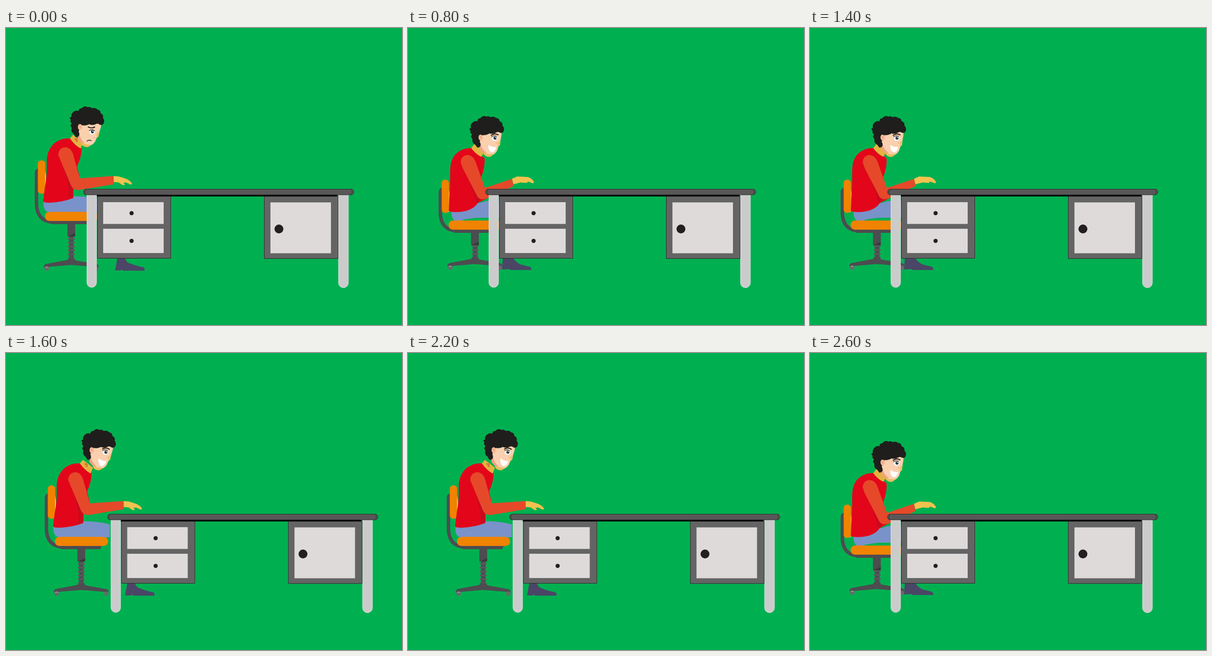
Animation, 864 px wide and 648 px high, one loop 2800 ms. Source, as an HTML page without scripts:

```html
<!DOCTYPE html>
<html lang="en">
<head>
<meta charset="utf-8">
<title>At the desk</title>
<style>
html, body { margin: 0; width: 100%; height: 100%; overflow: hidden; background: #00b050; }
svg { display: block; width: 864px; height: 648px; }
.pose { visibility: hidden; animation: 2.8s step-end infinite; }
.tired { animation-name: tired; }
.upright { animation-name: upright; }
.lean { animation-name: lean; }
.far { animation-name: far; }
.low { animation-name: low; }
.near { animation-name: near; }

/* the loop is 14 beats of 200 ms */
@keyframes tired { 0% { visibility: visible } 14.286%, 100% { visibility: hidden } }
@keyframes upright { 0% { visibility: hidden } 14.286% { visibility: visible } 21.429%, 100% { visibility: hidden } }
@keyframes lean { 0% { visibility: hidden } 21.429% { visibility: visible } 28.571%, 100% { visibility: hidden } }
@keyframes far {
  0%, 42.857%, 64.286%, 85.714%, 100% { visibility: hidden }
  35.714%, 57.143%, 78.571% { visibility: visible }
}
@keyframes low {
  0%, 35.714%, 57.143%, 78.571% { visibility: hidden }
  28.571%, 42.857%, 64.286%, 85.714%, 100% { visibility: visible }
}
@keyframes near {
  0%, 42.857%, 64.286%, 85.714%, 100% { visibility: visible }
  35.714%, 57.143%, 78.571% { visibility: hidden }
}

.red { fill: #e3061a; }
.shade { fill: #c90a1f; }
.sleeve { fill: #e5492a; }
.jeans { fill: #7992c9; }
.hand { fill: #f3c14e; }
.collar { fill: #e3b23f; }
.shoe { fill: #4b4666; }
.orange { fill: #f08300; }
.steel { fill: #4d4c50; }
.bar { fill: none; stroke: #4d4c50; stroke-width: 7.5; }
.panel { fill: #dedada; }
.knob { fill: #231f20; }
.cabinet { fill: #656465; stroke: #262626; }
.leg { fill: #cccbcb; stroke: #dcdcdc; }
.line { fill: none; stroke: #1d1d1b; stroke-linecap: round; }
</style>
</head>
<body>
<svg viewBox="0 0 864 648">
<defs>
  <g id="desk">
    <path class="leg" d="M176.500 362h21v193.500a10.500 10.500 0 0 1-21 0zM725.500 362h21.500v194a10.700 10.700 0 0 1-21.500 0z"/>
    <path class="cabinet" d="M199.500 366H359.500V502.500H199.500zM563.500 366H724.500V503H563.500z"/>
    <path class="panel" d="M212 380H344V427.500H212zM212 438H344V491H212zM577 380.500H709V491.500H577z"/>
    <circle class="knob" cx="274" cy="404" r="4.600"/>
    <circle class="knob" cx="274" cy="464.500" r="4.600"/>
    <circle class="knob" cx="595.500" cy="438.500" r="9.700"/>
    <path d="M198 362H723V367.500H198z"/>
    <rect x="169" y="351.500" width="590" height="12.500" rx="6.200" fill="#595758" stroke="#2b2a2b"/>
    <path class="line" d="M174 352q-4 6 0 12M753.500 352q4 6 0 12" stroke-width=".7"/>
  </g>

  <g id="base">
    <path class="steel" d="M137 502H148L152 507L197 515Q203 517 202 522L200 525L192 521L142 517L95 521L87 525Q82 524 82.500 519L86 515L134 506z"/>
    <circle cx="89" cy="525" r="4.800" fill="#6a686b"/>
    <circle cx="197" cy="525" r="4.800" fill="#6a686b"/>
    <path d="M85 523q3-3 7 0" fill="none" stroke="#aaa" stroke-width="1.500"/>
  </g>
  <g id="seat">
    <path class="steel" d="M94 420H187L184 428H98zM134 427h17v20l-17 8z"/>
    <path d="M134 455l17-8v8z" fill="#3a393c"/>
    <rect class="orange" x="85" y="401" width="116" height="20" rx="9.500"/>
  </g>
  <g id="back">
    <path d="M83 308q6 4 4 50l-4 2z" fill="#e9dcc0"/>
    <rect class="orange" x="69.500" y="289" width="16" height="72.500" rx="7"/>
  </g>
  <g id="chair">
    <path d="M142.500 455V505" stroke="#4d4c50" stroke-width="10"/>
    <path d="M142.500 458V502" stroke="#5a595c" stroke-width="15" stroke-dasharray="3.500 5"/>
    <use href="#base"/>
    <path class="bar" d="M73 311q-6-2-6.500 5V383Q67 421 101 423.500"/>
    <use href="#seat"/>
  </g>

  <path id="hair" fill="#1f1e1c" d="M164 191L168 189Q167 181 174 177Q178 174 184 176Q184 170 191 170A9 9 0 0 1 204 168Q209 166 213 170Q221 168 225 173Q232 174 232 181Q239 184 237 191Q242 197 238 204Q235 208 230 206Q226 202 221 205Q214 208 207 205Q199 209 192 207L187 213L184 221Q187 227 184 231Q181 234 177 232.500Q175 227 170 223Q167 219 169 213L166 208L169 203Q164 199 167 195z"/>
  <g id="face">
    <path d="M186 203H234Q233 213 229.500 222L227 233Q223 235 222 239Q219 249 208 253Q196 254 190 246L183 239L182 220z" fill="#fad0ae"/>
    <path d="M184 221Q186 238 197 247L190 247L182 238z" fill="#f1a184"/>
    <path d="M190 245Q200 252 210 250Q208 256 201 256Q193 255 190 249z" fill="#e8bd5e"/>
    <path d="M229.500 222L227 233L222 235L224 225z" fill="#edc26a"/>
  </g>
  <g id="ear">
    <ellipse cx="187" cy="212" rx="4.700" ry="6.600" fill="#f7b898"/>
    <path d="M185 210q3-1 3 4" fill="none" stroke="#e38a70"/>
  </g>
  <g id="smile">
    <use href="#face"/><use href="#hair"/><use href="#ear"/>
    <ellipse cx="217" cy="216.500" rx="6.200" ry="5.600" fill="#fff"/>
    <circle cx="218" cy="216.500" r="3.300" fill="#26333b"/>
    <circle cx="219" cy="215.300" r="1" fill="#fff"/>
    <path class="line" d="M211 213q5-3 11 0" stroke-width="1.300"/>
    <path class="line" d="M210.500 209.500Q218 205 225.500 210" stroke-width="2.200"/>
    <path d="M202 229.500Q208 236 218.500 236Q216 246 208.500 247Q200 244 202 229.500z" fill="#fff"/>
    <path d="M219 226q2 3 4 2" fill="none" stroke="#e79a78"/>
  </g>
  <g id="frown">
    <use href="#face"/><use href="#hair" y="1"/><use href="#ear"/>
    <ellipse cx="213.500" cy="222.500" rx="6.300" ry="5.800" fill="#fff"/>
    <circle cx="214" cy="222.500" r="3.200" fill="#26333b"/>
    <circle cx="215" cy="221.300" r="1" fill="#fff"/>
    <path class="line" d="M207 220q6-4 12 0" stroke-width="1.300"/>
    <path class="line" d="M205 212Q213 216 219 212" stroke-width="2.200"/>
    <path class="line" d="M202 243Q206 239 212 242" stroke-width="1.300"/>
    <path d="M217 234q2 3 4 1" fill="none" stroke="#e79a78"/>
  </g>

  <g id="sit">
    <use href="#chair"/><use href="#back"/>
    <path class="jeans" d="M82 379Q120 374 148 367Q180 367 205 374V402H92Q80 398 82 379z"/>
    <path class="orange" d="M94 401H192V421H94z"/>
    <path class="shoe" d="M243 502H260Q262 512 272 514Q284 519 300 522Q304 526 302 529.500H255L253 527L250 529H238z"/>
    <path class="red" d="M139 241Q122 239 106 251Q90 265 89 289Q90 320 85 346L81 378Q84 382 99 381Q126 379 147 371V351L160 322L155 302Q165 282 165 262z"/>
    <path class="shade" d="M119 285L143 346L147 352V369L136 373Q141 348 119 285z"/>
    <path class="collar" d="M146 233L139.500 241Q150 256 163 263L168 250z"/>
    <path d="M150 241l2 3m1-3l3 4m-4 1l4 2" stroke="#d33a26" stroke-width="1.500"/>
    <path class="sleeve" d="M114 277Q115 261 130 260Q141 261 146 274L161 328L234 323L235 341L161 353Q148 356 142 344z"/>
    <path class="hand" d="M235 323L246 324L259 328Q269 331 275 339L273 342L262 337L256 338L260 342L255 343L246 337L235 336z"/>
  </g>

  <g id="tall">
    <use href="#chair"/>
    <use href="#back" transform="rotate(-6.500 77 325)"/>
    <path class="jeans" d="M90 380Q120 374 150 367L205 372V403H92Q88 392 90 380z"/>
    <path class="orange" d="M94 402H192V421H94z"/>
    <path class="shoe" d="M247 502H271Q276 508 286 510L309 512.500Q313 515 309 517L265 526V531H252L251 527L245 527.500z"/>
    <path class="red" d="M95 244Q82 252 79.500 272Q78 296 84 318Q89 350 88 383Q125 382 152 368L149 338L150 308Q146 288 141 276Q137 253 125 248z"/>
    <path class="shade" d="M98 288L146 340L150 346L151 368L146 371Q144 336 98 288z"/>
    <path class="collar" d="M97 229L94 245Q108 254 124 249L125 236z"/>
    <path class="sleeve" d="M92 277Q92 259 106 257Q116 258 122 267L146 297Q157 308 168 315L242 323L241 341L158 342Q150 342 145 337L97 287Q92 283 92 277z"/>
    <path class="hand" d="M243 325L262 326Q274 329 283 340L282 344L270 345L258 340L241 340z"/>
  </g>

  <g id="hunch">
    <path d="M146.500 470V506" stroke="#4d4c50" stroke-width="10"/>
    <path d="M146.500 474V504" stroke="#5a595c" stroke-width="15" stroke-dasharray="3.500 5"/>
    <use href="#base" x="3.500" y="-2"/>
    <path class="bar" d="M77 353q-6-2-6.500 5V403Q71 440 105 442.500"/>
    <use href="#seat" x="3.500" y="19"/>
    <use href="#back" x="4" y="42"/>
    <path class="jeans" d="M95 400Q120 398 150 383L178 376L205 378V414L150 414Q122 417 117 420H101Q94 412 95 400z"/>
    <path class="shoe" d="M207 502H230Q236 512 246 516L266 521Q270 524 269 528H224L221 526L205 527z"/>
    <path class="red" d="M138 262Q118 261 104 275Q92 288 92 312Q92 345 90 372L89 400Q105 404 127 399Q146 393 152 382L172 372L160 325Q169 300 167 284z"/>
    <path class="shade" d="M119 302L152 370L157 373L150 383Q142 350 119 302z"/>
    <path class="collar" d="M145 253L138 262Q147 275 160 281L167 270z"/>
    <path class="sleeve" d="M115 293Q116 278 130 277Q142 278 147 291L168 349L227 329L230 345L176 370Q160 378 152 369L119 305z"/>
    <path class="hand" d="M227 329L238 324L261 325Q271 328 275 336L273 339L262 335L259 338L246 337L230 341z"/>
  </g>
</defs>

<rect width="864" height="648" fill="#00b050"/>

<g class="pose tired">
  <use href="#sit"/>
  <use href="#frown" x="-25.500" y="4"/>
</g>
<g class="pose upright">
  <use href="#tall"/>
  <use href="#smile" transform="translate(-85.500 -3) rotate(-19 187 212)"/>
</g>
<g class="pose lean">
  <use href="#sit"/>
  <use href="#smile" x="-22"/>
</g>
<g class="pose low">
  <use href="#hunch"/>
  <use href="#smile" transform="translate(-28.500 27) rotate(-6 187 212)"/>
</g>
<g class="pose near"><use href="#desk"/></g>
<g class="pose far">
  <use href="#sit" x="21.700"/>
  <use href="#smile"/>
  <use href="#desk" x="52.500"/>
</g>
</svg>
</body>
</html>
```
